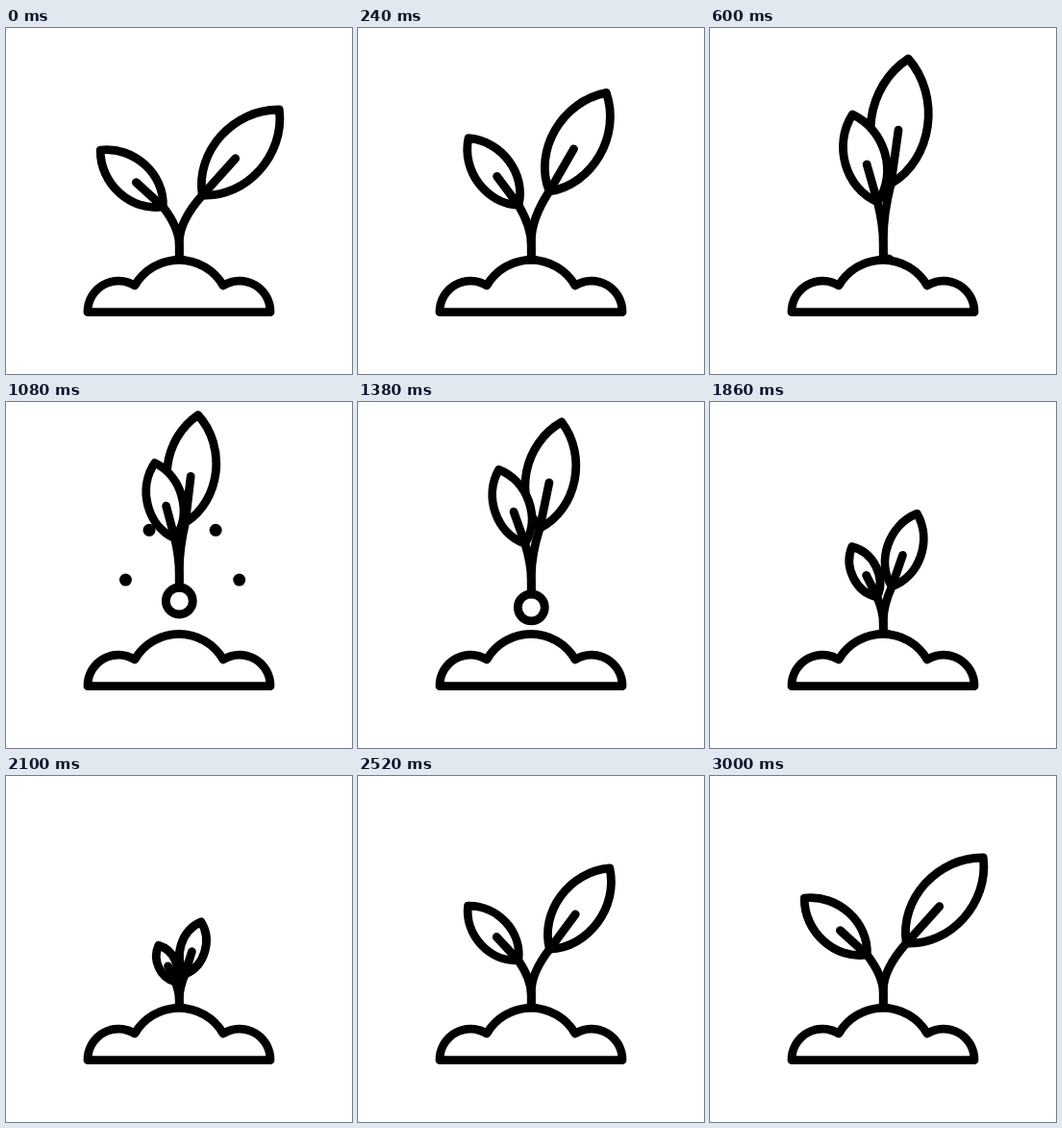
Recreate the animation shown at these times as an HTML page. Size 360 px wide and 360 px high, loop 5.63 s.

```html
<!DOCTYPE html>
<html lang="en">
<head>
<meta charset="utf-8">
<title>Sprout</title>
<style>
  html, body { margin: 0; width: 100%; height: 100%; overflow: hidden; background: #fff; }
  svg { display: block; width: 100%; height: 100%; }
  path, #seed { fill: #fff; stroke: #000; stroke-width: 8.8; stroke-linecap: round; stroke-linejoin: round; }
  .stem { fill: none; }
</style>
</head>
<body>
<svg viewBox="0 0 360 360">
  <g id="dots"></g>
  <g id="plant">
    <circle id="seed" cy="14" r="14"/>
  </g>
  <path d="M85 295.6A32 32 0 0 1 134 268A53 53 0 0 1 226 268A32 32 0 0 1 275 295.6Z"/>
</svg>
<script>
const LOOP = 5630, STEP = 30;
const $ = id => document.getElementById(id);
const mix = (a, b, k) => a + (b - a) * k;

function add(parent, tag, attributes) {
  const node = document.createElementNS('http://www.w3.org/2000/svg', tag);
  for (const name in attributes) node.setAttribute(name, attributes[name]);
  return parent.appendChild(node);
}

// Base and tip of each leaf relative to the root, folded up and spread open
const leaves = [
  { folded: [8, -79, 26, -209], open: [24, -67, 104, -156] },
  { folded: [-6, -60, -32, -151], open: [-17, -55, -82, -114] }
].map(leaf => ({
  ...leaf,
  blade: add($('plant'), 'path'),
  stem: add($('plant'), 'path', { class: 'stem' })
}));

// power shapes the easing into a key; negative eases out
const KEYS = [
  { time: 0,    spread: 1,    scale: 1,    root: 241 },
  { time: 600,  spread: 0,    scale: 1,    root: 241, power: 1.2 },
  { time: 1080, spread: -.04, scale: .85,  root: 193, power: -1.6 },
  { time: 1650, spread: .39,  scale: .94,  root: 211, power: 1.5 },
  { time: 1740, spread: .5,   scale: .86,  root: 241, power: 1 },
  { time: 2010, spread: .11,  scale: .32,  root: 241, power: 1.2 },
  { time: 3000, spread: 1,    scale: 1,    root: 241, power: -2.45 }
];

const ease = (u, power) => power > 0 ? u ** power : 1 - (1 - u) ** -power;

function poseAt(t) {
  const i = KEYS.findIndex(key => key.time > t);
  if (i < 0) return KEYS[KEYS.length - 1];
  const from = KEYS[i - 1], to = KEYS[i];
  const k = ease((t - from.time) / (to.time - from.time), to.power);
  const value = name => mix(from[name], to[name], k);
  return { spread: value('spread'), scale: value('scale'), root: value('root') };
}

function drawLeaf({ folded, open, blade, stem }, { spread, scale }) {
  const [bx, by, tx, ty] = folded.map((v, i) => mix(v, open[i], spread) * scale);
  const dx = tx - bx, dy = ty - by;
  const at = (along, side) => `${bx + dx * along - dy * side} ${by + dy * along + dx * side}`;
  blade.setAttribute('d',
    `M${at(0, 0)}C${at(.24, .3)} ${at(.74, .3)} ${at(1, 0)}` +
    `C${at(.74, -.3)} ${at(.24, -.3)} ${at(0, 0)}Z`);
  stem.setAttribute('d', `M${at(.43, 0)}L${at(0, 0)}Q0 ${by * .6} 0 ${by * .27}V0`);
}

// Soil crumbs: two mirrored pairs thrown in parabolas
const THROW_START = 575, THROW_TIME = 760;
const crumbs = [];
for (const side of [-1, 1]) {
  for (const [reach, height] of [[89, 84], [52, 142]]) {
    crumbs.push({ dot: add($('dots'), 'circle', { r: 6.5 }), reach: side * reach, height });
  }
}

function draw(t) {
  const pose = poseAt(t);
  $('plant').setAttribute('transform', `translate(180.3 ${pose.root})`);
  for (const leaf of leaves) drawLeaf(leaf, pose);

  const u = (t - THROW_START) / THROW_TIME;
  $('dots').style.display = u > 0 && u < 1 ? '' : 'none';
  for (const { dot, reach, height } of crumbs) {
    dot.setAttribute('cx', 183.6 + reach * u);
    dot.setAttribute('cy', 260 - height * 4 * u * (1 - u));
  }
}

const start = performance.now();
function frame() {
  const t = (performance.now() - start) % LOOP;
  draw(Math.floor(t / STEP) * STEP);
  requestAnimationFrame(frame);
}
frame();
</script>
</body>
</html>
```
